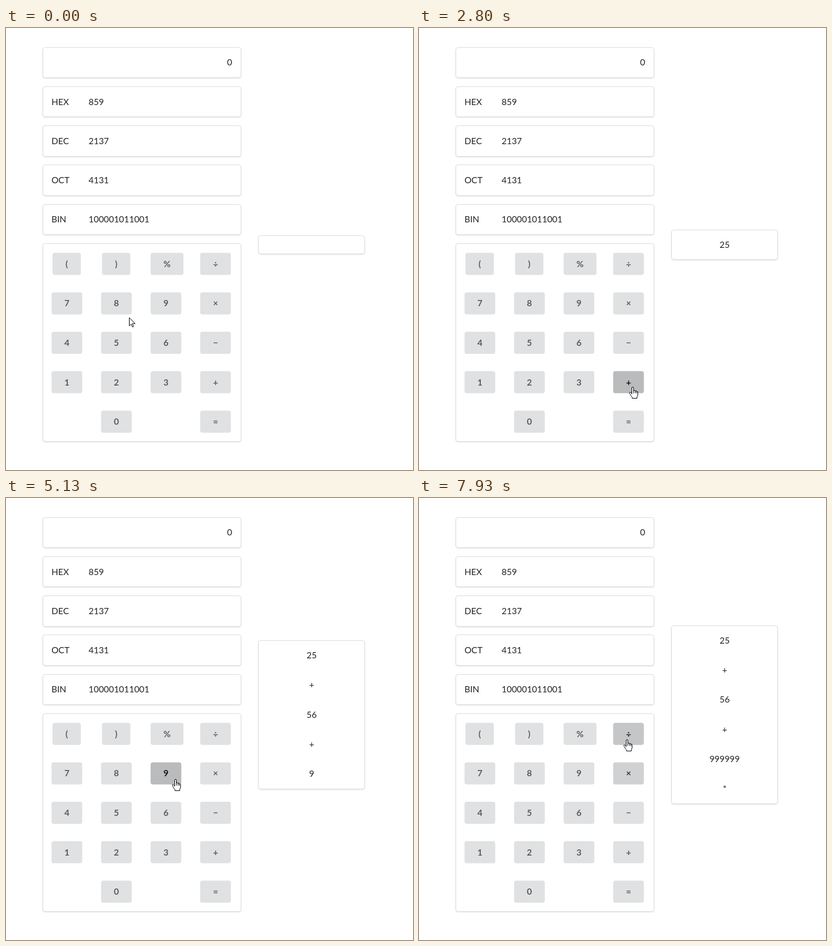
An HTML page for the animation above (8000 ms loop, 718 by 780 pixels).

```html
<!DOCTYPE html>
<html lang="en">
<head>
<meta charset="utf-8">
<title>Calculator</title>
<style>
html, body { margin: 0; width: 100%; height: 100%; overflow: hidden; background: #fff; }
svg { display: block; width: 718px; height: 780px; }
text { font: 15.4px Lato, sans-serif; fill: rgba(0, 0, 0, .87); }
.card { fill: #fff; stroke: #dededf; filter: drop-shadow(0 1px 1px rgba(34, 36, 38, .15)); }
.key text { font-weight: 700; text-anchor: middle; }
#rows text { text-anchor: middle; }
#cursor path { fill: #fff; stroke: #000; stroke-linejoin: round; stroke-linecap: round; }
</style>
</head>
<body>
<svg viewBox="0 0 718 780">
  <g id="cards"></g>
  <g id="keys"></g>
  <rect id="tape" class="card" x="445.5" width="187" rx="4"/>
  <g id="rows"></g>
  <g id="cursor">
    <path id="arrow" d="M.5 .5V14.7L3.8 11.5L6 16.7L8.1 15.8L5.9 10.7H10.4Z"/>
    <path id="hand" d="M-1.5 12.5V2Q-1.5 .5 0 .5Q1.5 .5 1.5 2V7.5Q1.5 6.5 3 6.5Q4.5 6.5 4.5 8Q4.5 7.2 5.8 7.2Q7 7.2 7 8.8Q7 8.3 8 8.4Q9 8.6 9 10V14Q9 16 7.5 18V20.5H-1V18.5Q-3 16.5 -4 14Q-5 12.5 -5.5 11.2Q-5.8 9.6 -4.5 9.6Q-3 9.8 -1.5 12.5ZM1.5 7.5V11M4.5 8V11M7 8.8V11.3"/>
  </g>
</svg>
<script>
const LOOP = 8000, STEP = 200 / 3;
const HOLD = 150, REPEAT = 180, FADE = 10;
const $ = id => document.getElementById(id);

function add(parent, tag, attrs, text) {
  const el = document.createElementNS('http://www.w3.org/2000/svg', tag);
  for (const name in attrs) el.setAttribute(name, attrs[name]);
  if (text) el.textContent = text;
  parent.appendChild(el);
  return el;
}

// Borders sit on whole pixels
function placeCard(rect, top, bottom) {
  const y = Math.floor(top);
  rect.setAttribute('y', y + .5);
  rect.setAttribute('height', Math.floor(bottom) - y);
}
function addCard(top, bottom) {
  placeCard(add($('cards'), 'rect', { class: 'card', x: 65, width: 349.5, rx: 4 }), top, bottom);
}

// Display, number bases and keypad frame
const number = 2137;
['', 'HEX', 'DEC', 'OCT', 'BIN'].forEach((name, i) => {
  const top = 34.05 + 69.25 * i, y = Math.floor(top + 32.75);
  addCard(top, top + 53.5);
  if (name) {
    const base = { HEX: 16, DEC: 10, OCT: 8, BIN: 2 }[name];
    add($('cards'), 'text', { x: 80.3, y }, name);
    add($('cards'), 'text', { x: 145.8, y }, number.toString(base));
  } else {
    add($('cards'), 'text', { x: 399, y, 'text-anchor': 'end' }, '0');
  }
});
addCard(380, 729);

// Keys
const keys = {};
['()%÷', '789×', '456−', '123+', ' 0 ='].forEach((line, row) => {
  [...line].forEach((label, col) => {
    if (label === ' ') return;
    const paren = '()'.includes(label);
    const x = 80.3 + 87.4 * col + (paren ? 1.7 : 0), y = 396.8 + 69.6 * row;
    const w = paren ? 50 : label === '%' ? 58 : 54.2, h = 39;
    const g = add($('keys'), 'g', { class: 'key' });
    const face = add(g, 'rect', { x, y, width: w, height: h, rx: 4 });
    const text = add(g, 'text', { x: x + w / 2, y: Math.round(y + 25) }, label);
    keys[label] = { label, x, y, w, h, face, text };
  });
});

// Pointer visits: key, offset within it, arrival time, clicks
const visits = [
  ['8', 49, 45, 140, 0], ['2', 1, 11, 640, 1], ['5', 57, 24, 1110, 1],
  ['=', 30, 27, 2000, 0], ['=', 30, 27, 2340, 0], ['+', 34, 27, 2690, 1],
  ['5', 32, 24, 3260, 1], ['6', 30, 21, 3790, 1], ['+', 35, 24, 4200, 1],
  ['9', 44, 30, 4980, 5], ['9', 44, 30, 6110, 1], ['×', 28, 19, 6700, 1],
  ['×', 28, 19, 7200, 0], ['÷', 24, 29, 7900, 1]
].map(([label, dx, dy, arrive, clicks]) => ({
  label, arrive, clicks,
  x: keys[label].x + dx,
  y: keys[label].y + dy,
  leave: arrive + (clicks ? HOLD + REPEAT * (clicks - 1) + 20 : 0)
}));

const presses = visits.flatMap(({ label, arrive, clicks }) =>
  Array.from({ length: clicks }, (_, i) => {
    const up = arrive + HOLD + REPEAT * i;
    return { label, down: i ? up - REPEAT / 2 : arrive, up };
  }));

function pointerAt(t) {
  const i = Math.max(0, visits.findLastIndex(v => v.arrive <= t));
  const from = visits[i], to = visits[i + 1] || from;
  const span = to.arrive - from.leave;
  const p = span > 0 ? Math.min(1, Math.max(0, (t - from.leave) / span)) : 0;
  const ease = p * p * (3 - 2 * p);
  return {
    x: Math.round(from.x + (to.x - from.x) * ease),
    y: Math.round(from.y + (to.y - from.y) * ease)
  };
}

function keyUnder({ x, y }) {
  const pad = 4;
  return Object.values(keys).find(k =>
    x >= k.x - pad && x <= k.x + k.w + pad && y >= k.y - pad && y <= k.y + k.h + pad);
}

// 0 idle, 1 hovered or focused, 2 pressed
function stateAt(t) {
  const over = keyUnder(pointerAt(t));
  const last = presses.findLast(p => p.down <= t);
  return key => {
    if (last && last.label === key.label) return t < last.up ? 2 : 1;
    return key === over ? 1 : 0;
  };
}

// Averaging the recent states gives a 100 ms fade
function paintKeys(t) {
  const past = Array.from({ length: FADE }, (_, i) => stateAt(t - 10 * (i + 1)));
  for (const key of Object.values(keys)) {
    const level = past.reduce((sum, state) => sum + state(key), 0) / FADE;
    const grey = 224 - 25 * level + 3 * level ** 2;
    const alpha = .6 + .25 * level - .05 * level ** 2;
    key.face.setAttribute('fill', `rgb(${grey},${grey + 1},${grey + 2})`);
    key.text.style.fill = `rgba(0,0,0,${alpha})`;
  }
}

function tokensAt(t) {
  const out = [];
  for (const { label, up } of presses) {
    if (up > t) break;
    const end = out.length - 1;
    if (/\d/.test(label) && /\d/.test(out[end])) out[end] += label;
    else out.push(label === '×' ? '*' : label);
  }
  return out;
}

const rows = Array.from({ length: 6 }, () => add($('rows'), 'text', { x: 539.2 }));
function paintTape(t) {
  const tokens = tokensAt(t), n = tokens.length;
  const half = n ? 26.17 * n : 15.9;
  placeCard($('tape'), 382.2 - half, 382.5 + half);
  rows.forEach((row, i) => {
    row.textContent = tokens[i] || '';
    row.setAttribute('y', Math.floor(388 + 52.3 * (i - (n - 1) / 2)));
  });
}

function paintPointer(t) {
  const at = pointerAt(t), over = keyUnder(at);
  $('cursor').setAttribute('transform', `translate(${at.x} ${at.y})`);
  $('hand').style.display = over ? '' : 'none';
  $('arrow').style.display = over ? 'none' : '';
}

function draw(now) {
  // Motion advances at fifteen steps a second
  const t = Math.floor((now % LOOP + 4) / STEP) * STEP;
  paintKeys(t);
  paintTape(t);
  paintPointer(t);
}

const start = performance.now();
function tick() {
  draw(performance.now() - start);
  requestAnimationFrame(tick);
}
tick();
</script>
</body>
</html>
```
